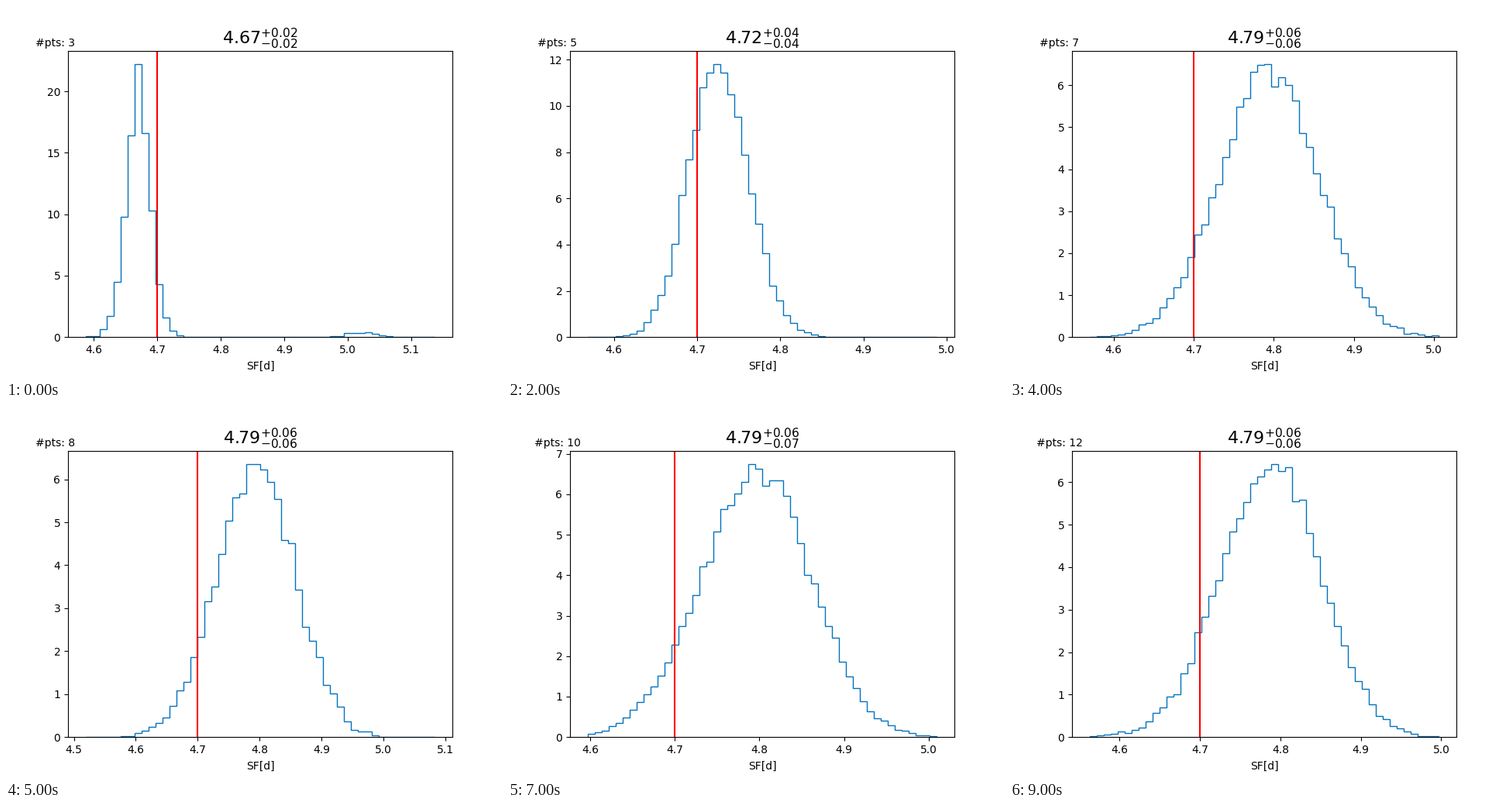
Write a matplotlib script that moves like this. It is 640x480 px and loops after 10 s.

```python
import numpy as np
import matplotlib.pyplot as plt
from matplotlib.animation import FuncAnimation

BINS = 50
FIRST = 3        # points in the first fit
NOISE = 0.08     # counting scatter, grows with the root of the height
TRUTH = 4.7
BLUE = "#0072bd"

# median, upper and lower error, range, highest bin,
# peak position and left / right width in bins
FITS = [
    (4.67, .02, .02, 4.5870, 5.1375, 22.2, 7.0, 2.26, 2.2),
    (4.69, .03, .03, 4.5800, 5.0360, 14.0, 11.6, 4.5, 4.5),
    (4.72, .04, .04, 4.5682, 4.9882, 11.8, 17.8, 5.65, 6.5),
    (4.79, .07, .07, 4.5729, 4.9959, 5.77, 24.5, 11.0, 12.0),
    (4.79, .06, .06, 4.5700, 5.0060, 6.50, 25.1, 10.0, 10.0),
    (4.79, .06, .06, 4.5187, 5.0834, 6.35, 24.0, 8.0, 7.85),
    (4.79, .06, .06, 4.5907, 4.9942, 7.05, 25.3, 11.4, 9.6),
    (4.79, .06, .07, 4.5968, 5.0097, 6.74, 24.0, 11.7, 10.6),
    (4.79, .06, .06, 4.5870, 5.0082, 6.60, 23.9, 10.4, 10.4),
    (4.79, .06, .06, 4.5627, 4.9971, 6.42, 26.0, 10.7, 9.5),
]

fig, ax = plt.subplots(figsize=(6.4, 4.8), dpi=100)


def bell(centre, left, right, power=2.0):
    """Two-sided bell over the bins, with a peak of one."""
    d = np.arange(BINS) - centre
    return np.exp(-np.abs(d / np.where(d < 0, left, right)) ** power)


def density(i):
    """Bin heights of one fit, with seeded scatter."""
    top, centre, left, right = FITS[i][5:]
    if i == 0:
        # the sparsest fit has heavier tails and a faint second solution
        h = top * bell(centre, left, right, 1.62) + 0.4 * bell(39, 3, 3)
    else:
        h = top * bell(centre, left, right)
    rng = np.random.default_rng(i + FIRST)
    h = np.maximum(h + NOISE * np.sqrt(h) * rng.standard_normal(BINS), 0)
    return h * top / h.max()


def draw(i):
    mid, up, down, lo, hi = FITS[i][:5]
    edges = np.linspace(lo, hi, BINS + 1)
    ax.clear()
    ax.hist(edges[:-1], edges, weights=density(i), histtype="step",
            color=BLUE, lw=1)
    ax.axvline(TRUTH, color="red", lw=1.5)
    ax.set_xlabel("SF[d]", labelpad=4.72)
    ax.set_title(f"${mid:.2f}^{{+{up:.2f}}}_{{-{down:.2f}}}$", fontsize=16)
    ax.text(0.1, 0.9, f"#pts: {i + FIRST}", ha="center", va="center",
            transform=fig.transFigure)
    return []


anim = FuncAnimation(fig, draw, frames=len(FITS), interval=1000,
                     init_func=lambda: draw(0), repeat=True, repeat_delay=0)
plt.show()
```
